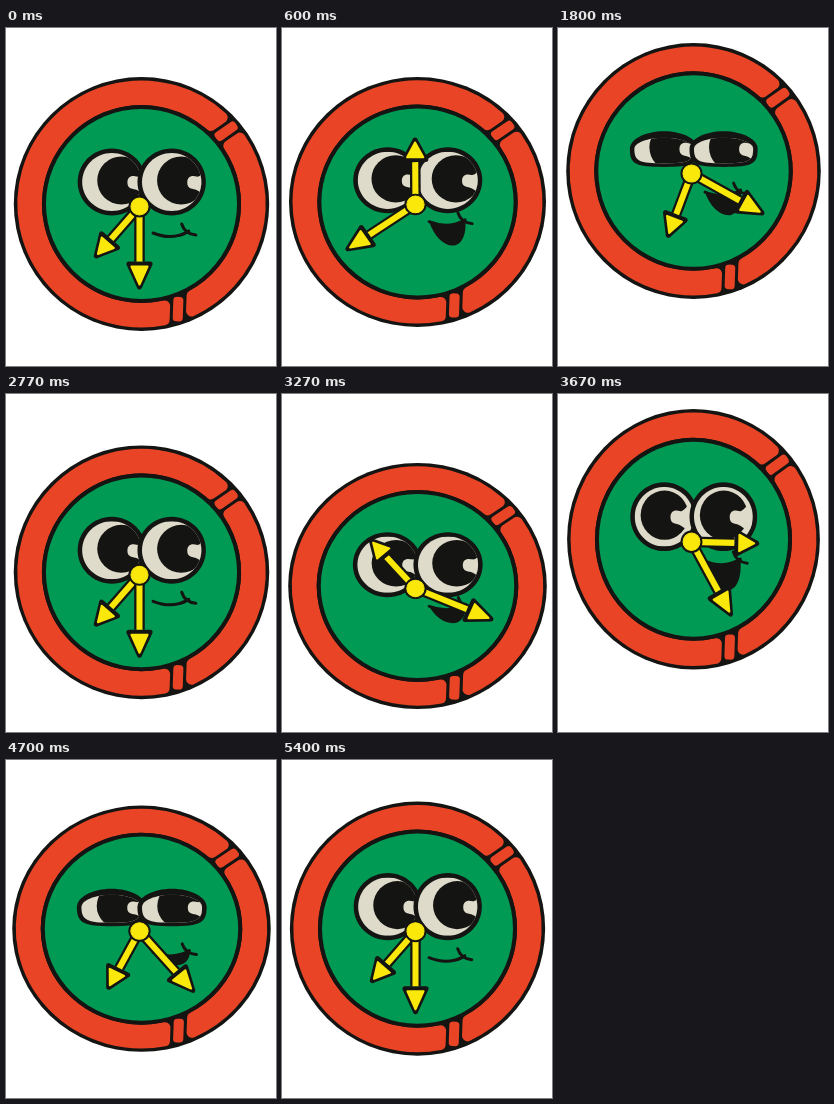
An HTML page that plays this animation: 270 px wide and 338 px high, repeating every 5.43 s.

```html
<!DOCTYPE html>
<html lang="en">
<head>
<meta charset="utf-8">
<title>Jumping clock</title>
<style>
  html, body { margin: 0; width: 100%; height: 100%; overflow: hidden; background: #fff; }
  svg { display: block; width: 100%; height: 100%; }
  .ink { fill: #141412; }
  .red { fill: #e94426; }
  .cream { fill: #dfdbcb; }
  .sector { stroke: #e94426; stroke-width: 11; stroke-linejoin: round; }
  .line { fill: none; stroke: #141412; stroke-width: 3; stroke-linecap: round; stroke-linejoin: round; }
  .edge { fill: #141412; stroke: #141412; stroke-linejoin: round; }
  .gold { fill: #f9e80a; stroke: #f9e80a; stroke-linejoin: round; }
</style>
</head>
<body>
<svg viewBox="0 0 270 338">
  <defs>
    <clipPath id="clipL"><path id="innerL"/></clipPath>
    <clipPath id="clipR"><path id="innerR"/></clipPath>
    <g id="pupil">
      <circle class="ink" r="24"/>
      <path class="cream" d="M6 2C6 -5 12 -5 15 -4S21 -7 24 -10L30 14C20 15 18 10 14 9S6 8 6 2Z"/>
    </g>
  </defs>
  <g id="clock">
    <circle class="ink" r="127"/>
    <g id="ring"></g>
    <circle class="ink" r="99"/>
    <circle r="95" fill="#009a55"/>

    <g id="mouth">
      <path class="ink" id="gap"/>
      <path class="line" d="M11.5 29Q31 37 47 27"/>
      <path class="line" d="M40 20Q43 30 54 31"/>
    </g>

    <g transform="translate(-29.5 -22)">
      <path class="ink" id="outerL"/>
      <g clip-path="url(#clipL)">
        <rect class="cream" x="-40" y="-40" width="80" height="80"/>
        <use href="#pupil" class="look"/>
      </g>
    </g>
    <g transform="translate(30 -22)">
      <path class="ink" id="outerR"/>
      <g clip-path="url(#clipR)">
        <rect class="cream" x="-40" y="-40" width="80" height="80"/>
        <use href="#pupil" class="look"/>
      </g>
    </g>

    <g transform="translate(-2 2.5)">
      <g id="short"></g>
      <g id="long"></g>
      <circle class="ink" r="11"/>
      <circle class="gold" r="8.5" stroke="none"/>
    </g>
  </g>
</svg>
<script>
const LOOP = 5430, CYCLE = 2740;
const $ = id => document.getElementById(id);
const set = (id, name, value) => $(id).setAttribute(name, value);
const looks = document.querySelectorAll('.look');

// Keys are [ms within the cycle, value].
const height = [[0, 176], [310, 218], [500, 192], [600, 174], [860, 147], [1200, 137],
  [1430, 133], [1800, 143], [2000, 175], [2180, 167.5], [2300, 169], [2650, 168.5]];
const stretch = [[0, 127], [310, 120], [500, 123], [600, 125], [860, 130], [1380, 132],
  [1800, 128], [2000, 122], [2180, 128], [2300, 127.5]];
const gape = [[100, 0], [500, .5], [600, .75], [1380, 1], [1800, .7], [2100, 0]];
const lift = [[100, 0], [600, -9], [1380, -5], [1800, -8], [2100, 0]];
const squint = [[1500, 0], [1750, 1], [1900, 1], [2100, 0]];
const gaze = [[100, 9.5], [600, 8], [1100, -4], [1400, -5], [1800, 9.5]];

// Smooth cyclic curve through the keys, without overshoot.
function track(keys, t) {
  const n = keys.length;
  const key = i => {
    const k = keys[(i + n) % n];
    return [k[0] + Math.floor(i / n) * CYCLE, k[1]];
  };
  const slope = i => (key(i + 1)[1] - key(i)[1]) / (key(i + 1)[0] - key(i)[0]);
  const tangent = i => {
    const a = slope(i - 1), b = slope(i);
    return a * b <= 0 ? 0 : 2 * a * b / (a + b);
  };
  let i = -1;
  while (key(i + 1)[0] <= t) i++;
  const [t0, v0] = key(i), [t1, v1] = key(i + 1);
  const d = t1 - t0, u = (t - t0) / d, w = 1 - u;
  return v0 * (1 + 2 * u) * w * w + v1 * u * u * (3 - 2 * u)
    + d * u * w * (tangent(i) * w - tangent(i + 1) * u);
}

// cubic-bezier(.245, 0, .106, 1)
function ease(x) {
  if (x <= 0 || x >= 1) return x <= 0 ? 0 : 1;
  let lo = 0, hi = 1, s;
  for (let i = 0; i < 30; i++) {
    s = (lo + hi) / 2;
    const w = 1 - s;
    if (.735 * s * w * w + .318 * s * s * w + s * s * s < x) lo = s; else hi = s;
  }
  return s * s * (3 - 2 * s);
}

// Each cut crosses the ring along a line: direction in degrees, distance from the centre.
const cuts = [{ dir: -35, off: -11.3 }, { dir: 92, off: -40 }];

function sector(from, to, big) {
  const at = (r, cut, gap) => {
    const a = cut.dir * Math.PI / 180 + Math.asin((cut.off + gap) / r);
    return `${r * Math.cos(a)} ${r * Math.sin(a)}`;
  };
  const r0 = 104.5, r1 = 118, gap = 13.5;
  return `<path class="red sector" d="M${at(r1, from, gap)}A${r1} ${r1} 0 ${big} 1 ${at(r1, to, -gap)}
    L${at(r0, to, -gap)}A${r0} ${r0} 0 ${big} 0 ${at(r0, from, gap)}Z"/>`;
}

function block({ dir, off }) {
  const x = Math.sqrt(111 * 111 - off * off);
  return `<rect class="red" x="${x - 12}" y="${off - 5}" width="24.5" height="10" rx="3.5" transform="rotate(${dir})"/>`;
}

function hand(base, tip) {
  return `<path class="edge" stroke-width="10.5" d="M0 0V${-base}"/>
    <path class="edge" stroke-width="5" d="M-10.5 ${-base - 2.5}H10.5L0 ${3.5 - tip}Z"/>
    <path class="gold" stroke-width="6" d="M0 0V${-base}"/>
    <path class="gold" stroke-width="2" d="M-8 ${-base - 5}H8L0 ${6 - tip}Z"/>`;
}

// Eye outline: the lower edge flattens as k grows.
function lid(r, top, bottom, k) {
  const c = .552 * r, flat = k * r;
  return `M${-r} 0C${-r} ${-.552 * top} ${-c} ${-top} 0 ${-top}S${r} ${-.552 * top} ${r} 0`
    + `C${r} ${k * bottom} ${flat} ${bottom} 0 ${bottom}S${-r} ${k * bottom} ${-r} 0Z`;
}

function drawEye(side, r, q) {
  const k = .552 + .3 * q, mix = (a, b) => a + (b - a) * q;
  set('outer' + side, 'd', lid(r, mix(r - .5, 17.5), mix(r - .5, 18), k));
  set('inner' + side, 'd', lid(r - 4.5, mix(r - 5, 11), mix(r - 5, 14.5), k));
}

function draw(time) {
  // 25 steps a second shown on a 30 Hz clock.
  const slot = Math.floor((time % LOOP + 4) * .03);
  const t = Math.floor(slot / 1.2 + .001) * 40 % CYCLE;

  const ry = track(stretch, t), rx = 127.5 + (127.5 - ry) * .4;
  set('clock', 'transform', `translate(135.5 ${track(height, t)}) scale(${rx / 127} ${ry / 127})`);

  const turn = ease((t - 49) / 2600);
  set('short', 'transform', `rotate(${221 + 360 * turn})`);
  set('long', 'transform', `rotate(${180 + 1080 * turn})`);

  const q = track(squint, t);
  drawEye('L', 34, q);
  drawEye('R', 34, q);
  const x = track(gaze, t);
  looks.forEach(el => el.setAttribute('transform', `translate(${x} -1.5)`));

  const g = track(gape, t), low = 33 + 27 * g;
  set('mouth', 'transform', `translate(0 ${track(lift, t)})`);
  set('gap', 'd', `M11.5 29Q31 37 47 27C49 ${27 + 18 * g} 44 ${low} 35 ${low}C25 ${low} 16 ${29 + 18 * g} 11.5 29Z`);
}

const [upper, lower] = cuts;
$('ring').innerHTML = sector(upper, lower, 0) + sector(lower, upper, 1) + cuts.map(block).join('');
$('short').innerHTML = hand(43, 69);
$('long').innerHTML = hand(55, 84);

const start = performance.now();
function tick() {
  draw(performance.now() - start);
  requestAnimationFrame(tick);
}
tick();
</script>
</body>
</html>
```
